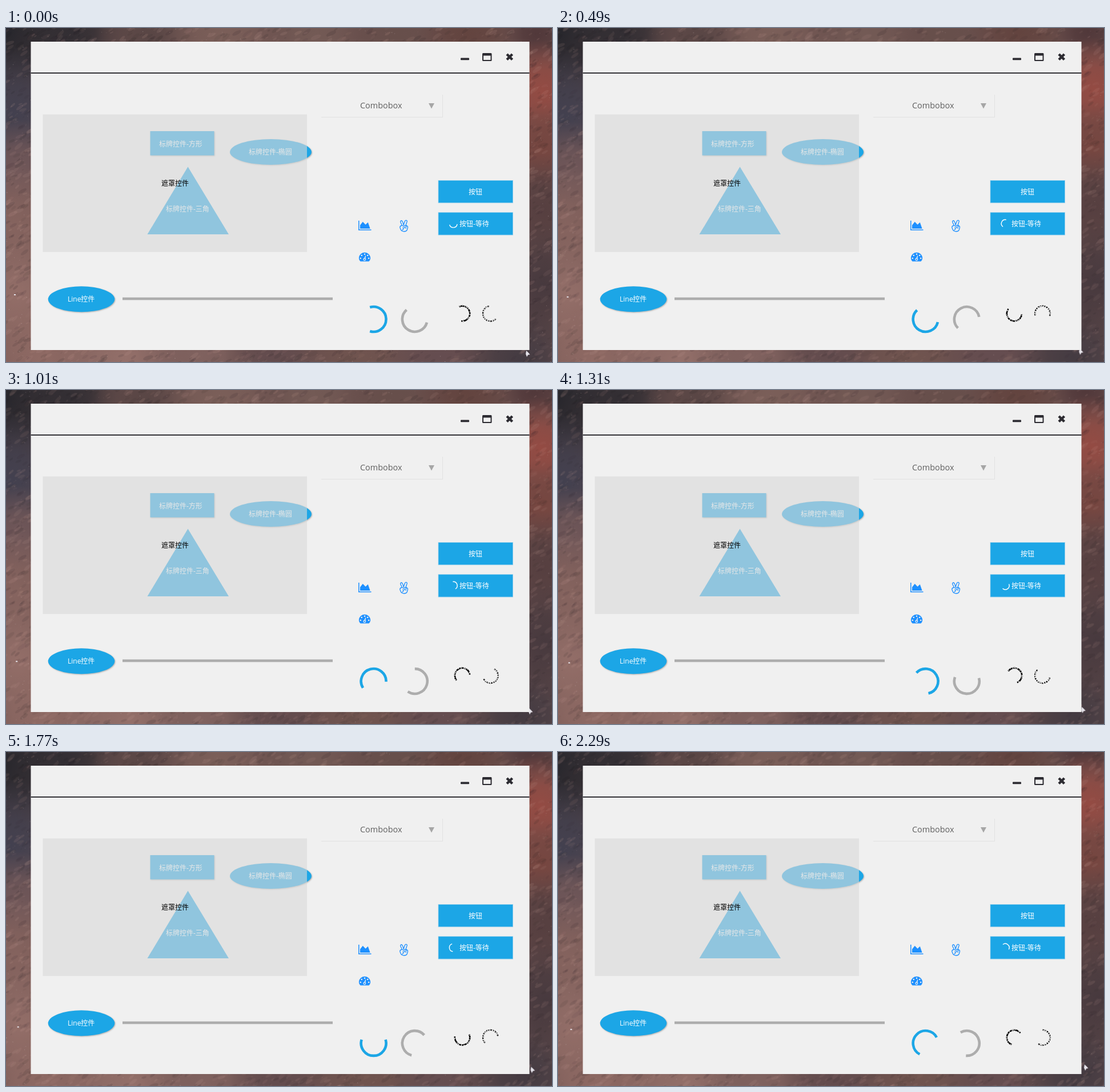
An HTML page with a canvas that plays this animation: 956 by 586 pixels, repeating every 2390 ms.

```html
<!DOCTYPE html>
<html lang="zh-CN">
<head>
<meta charset="utf-8">
<style>
html, body { margin: 0; width: 100%; height: 100%; overflow: hidden; background: #5f4a4a; }
#stage { position: relative; width: 956px; height: 586px; overflow: hidden; }
#sky { position: absolute; left: -22px; top: -27px; transform-origin: 500px 320px; }
svg { position: absolute; left: 0; top: 0; }
text { font: 12px "Open Sans", "Noto Sans CJK SC", "Noto Sans CJK", sans-serif; fill: #fff; }
.blue { fill: #1ca6e6; }
.icon { fill: #1e90ff; }
.shade { filter: drop-shadow(1px 1px 1px rgba(0, 0, 0, .28)); }
.spin path { fill: none; }
</style>
</head>
<body>
<div id="stage">
<canvas id="sky" width="1000" height="640"></canvas>
<svg width="956" height="586" viewBox="0 0 956 586">
  <rect x="43.5" y="24" width="873" height="541" fill="#f0f0f0"/>
  <rect x="43.5" y="78" width="873" height="2" fill="#333237"/>

  <g fill="#2c2b31">
    <rect x="796" y="52.5" width="15" height="3.8" rx="1"/>
    <path fill-rule="evenodd" d="M835.5 44h13.5q1.5 0 1.5 1.500v11q0 1.500-1.500 1.500h-13.500q-1.500 0-1.500-1.500v-11q0-1.500 1.500-1.500zM836 48.500v7.500h12.500v-7.500z"/>
    <path d="M877 46L886.500 55.500M886.500 46L877 55.500" stroke="#2c2b31" stroke-width="4.400"/>
  </g>

  <path d="M552 156.500H765M764.500 117V157" fill="none" stroke="#e1e1e1"/>
  <text x="620" y="141" style="font-size:14.400px;fill:#606060">Combobox</text>
  <path d="M740 132h10l-5 9.500z" fill="#a6a6a6"/>

  <rect class="blue shade" x="252.500" y="181" width="112" height="42.500"/>
  <text x="268" y="207.500">标牌控件-方形</text>
  <ellipse class="blue shade" cx="463.500" cy="217.500" rx="71.500" ry="22.500"/>
  <text x="425" y="221.500">标牌控件-椭圆</text>
  <path class="blue" d="M318.500 243.500L390 362H247.500z"/>
  <text x="280" y="321.500">标牌控件-三角</text>
  <rect x="64.500" y="151.500" width="462.500" height="241.500" fill="#d9d9d9" fill-opacity=".61"/>
  <text x="272" y="277" style="fill:#000">遮罩控件</text>

  <ellipse class="blue shade" cx="132" cy="475.800" rx="58.300" ry="22.500"/>
  <text x="108" y="479.500">Line控件</text>
  <rect x="204" y="472.700" width="368" height="4.600" fill="#adadad"/>

  <g stroke="#8fcdec" stroke-width=".8">
    <rect class="blue" x="757" y="267.400" width="130.500" height="39.400"/>
    <rect class="blue" x="757" y="323.700" width="130.500" height="39.400"/>
  </g>
  <text x="810" y="291.500">按钮</text>
  <text x="794" y="348">按钮-等待</text>

  <path class="icon" d="M617 338h1.500v15.500h21v1.500h-22.500zM620 352v-6l4.700-6 4.800 5 4.300-4 3.800 11z"/>
  <g fill="none" stroke="#1e90ff" stroke-width="1.300" stroke-linejoin="round" stroke-linecap="round">
    <path d="M693.500 346.500L690.700 340.500Q690.500 338 692.500 338T696 345.500L698.600 338.500Q699.500 336.800 701.300 337.600T701.500 341.500L700 346.500Q703.500 347 703.500 349.500L702.500 353.500Q701.500 357 697 357Q693 357 691.300 354L689.800 350Q689.600 347 693.500 346.500L698 349Q698.500 351.500 694.500 350.700M700 346.500L697 346.300M700.500 347L700 351.500M696 352.500L694 354.500"/>
  </g>
  <path class="icon" d="M620.500 409.500Q617.800 406.500 617.800 403.800A10.200 10 0 0 1 638.200 403.800Q638.200 406.500 635.500 409.500z"/>
  <g fill="#f0f0f0">
    <circle cx="620.800" cy="404" r="1.300"/><circle cx="622.800" cy="399" r="1.300"/>
    <circle cx="628" cy="396.800" r="1.300"/><circle cx="633.200" cy="399" r="1.300"/>
    <circle cx="635.200" cy="404" r="1.300"/><circle cx="627.800" cy="406" r="2.400"/>
    <path d="M627 405L629.300 399.200L630.200 399.500L629 405.500z"/>
  </g>
  <circle class="icon" cx="627.800" cy="406" r="1.200"/>
  <g id="spinners"></g>
</svg>
</div>
<script>
const LOOP = 2390, STEP = 15, TILT = -0.06;
// [step, time in ms]; the steps between are evenly spaced
const BEATS = [[0, 0], [1, 60], [4, 270], [9, 550], [10, 610], [12, 720], [17, 1010], [19, 1130],
  [20, 1190], [22, 1310], [28, 1660], [29, 1720], [30, 1770], [38, 2240], [39, 2290]];
const times = [0];
for (let i = 1; i < BEATS.length; i++) {
  const [k0, t0] = BEATS[i - 1], [k1, t1] = BEATS[i];
  for (let k = k0 + 1; k <= k1; k++) {
    times.push(Math.round((t0 + (t1 - t0) * (k - k0) / (k1 - k0)) / 10) * 10);
  }
}

const spinners = [];
function arc(r, span, color, width, dash = '') {
  const a = span / 2 * Math.PI / 180;
  const x = r * Math.cos(a), y = r * Math.sin(a);
  return `<path d="M${x} ${-y}A${r} ${r} 0 ${span > 180 ? 1 : 0} 1 ${x} ${y}"
    stroke="${color}" stroke-width="${width}" stroke-dasharray="${dash}"/>`;
}
function spinner(x, y, phase, arcs) {
  const g = document.createElementNS('http://www.w3.org/2000/svg', 'g');
  g.setAttribute('class', 'spin');
  g.innerHTML = arcs;
  document.getElementById('spinners').append(g);
  spinners.push({ g, x, y, phase });
}
spinner(643.6, 511, 0, arc(21.9, 214, '#1ca6e6', 4.6));
spinner(715.8, 511, 122, arc(21.9, 214, '#adadad', 4.6));
spinner(783.2, 343.2, 85, arc(6.9, 155, '#fff', 1.4));
spinner(799, 501, -8, arc(13.2, 212, '#000', 2.6, '9 1 4 1 2 1') + arc(13.6, 206, '#fff', 1, '2 3 1 5'));
spinner(848.3, 501, 152, arc(13.2, 212, '#000', 2.4, '3 1.2 2 1.4') + arc(12.8, 206, '#fff', 1.1, '2 2 3 2'));

const sky = document.getElementById('sky');
const ctx = sky.getContext('2d');
let seed = 7;
const rnd = () => (seed = seed * 16807 % 2147483647) / 2147483647;

function paintSky() {
  ctx.translate(22, 27);
  ctx.fillStyle = '#694f4d';
  ctx.fillRect(-22, -27, 1000, 640);
  const clouds = [
    [0, 0, 170, '#25252b'], [110, 5, 110, '#322e33'], [10, 150, 120, '#42404f'],
    [20, 250, 90, '#705759'], [15, 350, 110, '#86645f'], [20, 470, 110, '#946f69'],
    [60, 580, 140, '#8f6a64'], [210, 580, 120, '#94706a'], [340, 575, 110, '#80625f'],
    [470, 575, 90, '#634c4e'], [620, 575, 110, '#70544f'], [760, 575, 100, '#654d50'],
    [900, 580, 110, '#443b42'], [250, 10, 90, '#594645'], [380, 10, 110, '#7b5f59'],
    [540, 10, 90, '#735a55'], [680, 10, 90, '#674f4b'], [810, 10, 90, '#63443f'],
    [930, 10, 60, '#51383a'], [940, 110, 90, '#944b43'], [940, 210, 80, '#774640'],
    [940, 320, 100, '#563f40'], [940, 450, 110, '#47393e']];
  for (const [x, y, r, color] of clouds) {
    const g = ctx.createRadialGradient(x, y, 0, x, y, r);
    g.addColorStop(0, color);
    g.addColorStop(.4, color + 'c8');
    g.addColorStop(1, color + '00');
    ctx.fillStyle = g;
    ctx.fillRect(x - r, y - r, 2 * r, 2 * r);
  }
  // wisps and grain
  for (let i = 0; i < 5000; i++) {
    const x = rnd() * 1000 - 22, y = rnd() * 640 - 27, s = 1 + rnd() * 5, lit = rnd() < .5;
    ctx.globalAlpha = .04 + rnd() * .09;
    ctx.fillStyle = lit ? '#d5aba0' : '#1d181d';
    ctx.beginPath();
    ctx.ellipse(x, y, s * 1.6, s * .6, -.8 + rnd() * .5, 0, 7);
    ctx.fill();
  }
  for (let i = 0; i < 700; i++) {
    ctx.globalAlpha = .15 + rnd() * .35;
    ctx.fillStyle = '#d8c8c8';
    ctx.fillRect(rnd() * 1000 - 22, rnd() * 640 - 27, 1, 1);
  }
  ctx.globalAlpha = 1;
  ctx.fillStyle = '#e6e3ea';
  ctx.fillRect(14, 467, 3, 2);
  ctx.beginPath();
  ctx.moveTo(911, 566);
  ctx.lineTo(914.5, 569.5);
  ctx.lineTo(917.5, 573);
  ctx.lineTo(914, 573.5);
  ctx.lineTo(912, 577);
  ctx.lineTo(910, 572);
  ctx.fill();
}
paintSky();

function draw(now) {
  const t = now % LOOP;
  let k = times.length - 1;
  while (times[k] > t) k--;
  for (const s of spinners) {
    s.g.setAttribute('transform', `translate(${s.x} ${s.y}) rotate(${s.phase + STEP * k})`);
  }
  sky.style.transform = `rotate(${TILT * k}deg)`;
}
const start = performance.now();
function tick() {
  draw(performance.now() - start);
  requestAnimationFrame(tick);
}
tick();
</script>
</body>
</html>
```
